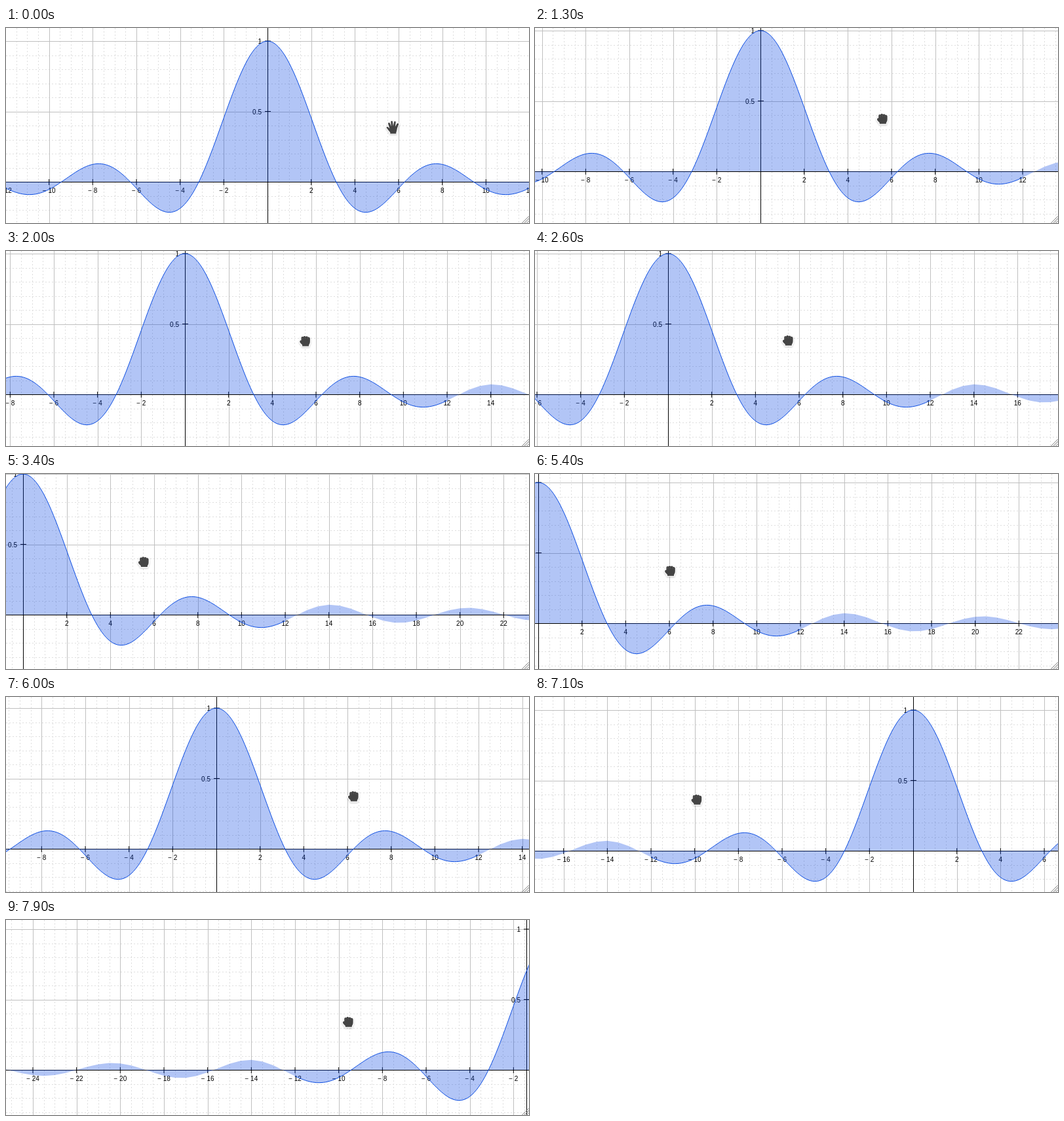
Animation of 798 by 298 pixels, one loop 8000 ms. Source, as an HTML page:

```html
<!DOCTYPE html>
<html lang="en">
<head>
<meta charset="utf-8">
<title>Dragging a function graph</title>
<style>
html, body { margin: 0; width: 100%; height: 100%; overflow: hidden; background: #fff; }
svg { display: block; }
path { fill: none; }
text { font: 10px "Liberation Sans", Arial, sans-serif; fill: #000; }
#minor { stroke: #dedede; stroke-dasharray: 2 3; }
#major { stroke: #c0c0c0; }
#axes { stroke: #000; }
#area { fill: #0040e0; fill-opacity: .3; }
#curve { stroke: #0d4ee2; }
.halo { stroke: #fff; stroke-width: 2.4; fill: #fff; stroke-linejoin: round; filter: drop-shadow(0 1px 1px #0003); }
.skin { fill: #444; }
.crease { stroke: #666; stroke-width: .5; }
</style>
</head>
<body>
<svg width="798" height="298" viewBox="0 0 798 298">
  <path id="minor"/>
  <path id="major"/>
  <path id="axes"/>
  <g id="labels"></g>
  <path id="area"/>
  <path id="curve"/>
  <path d="M787.5 298L798 287.5M791 298L798 291M794.5 298L798 294.5" stroke="#777"/>
  <g id="open">
    <path class="halo"/><path class="skin"/>
  </g>
  <g id="fist">
    <g transform="scale(1.12)">
      <path class="halo"/><path class="skin"/>
      <path class="crease" d="M-3.2 -5V-2.5M.3 -5.6V-3M3.6 -5V-2.5"/>
    </g>
  </g>
</svg>
<script>
const W = 798, H = 298, LOOP = 8000, STEP = 100;
const UX = 100 / 3, UY = 215, DRAWN = 12;
const $ = id => document.getElementById(id);

// [time, x, y]
const hand = [
  [900, 590, 152], [1300, 530, 139], [2600, 386, 137], [3400, 210, 134.5],
  [4400, 16, 145.5], [4800, 16, 145.5], [6000, 530, 152], [6500, 762, 154],
  [7000, 240, 157], [7900, 522, 156]
];
const origin = [
  [900, 399, 235], [1300, 344, 219], [2600, 203, 219], [3400, 26, 215],
  [4400, -176, 226], [4800, -176, 226], [6000, 321, 232], [6500, 571, 235],
  [7000, 571, 235], [7900, 841, 229]
];

const shapes = {
  open: "M-9.4 .6C-9.8 -.9 -8 -1.6 -6.8 -.4L-4.6 1.7L-6.9 -5.6C-7.4 -7.6 -5 -8.4 -4.2 -6.6" +
    "L-2.3 -1.8L-2.8 -8.2C-2.8 -10.4 -.3 -10.5 0 -8.4L.7 -2.2L2.1 -8.4C2.6 -10.3 5 -9.8 4.7 -7.8" +
    "L3.9 -1.3L6.6 -5.8C7.6 -7.4 9.8 -6.2 9 -4.4L6.9 1.2C6.4 4.2 6 6 5.3 7.6V9.4H-3.8V7.6" +
    "C-5.4 5.6 -7.2 3.6 -9.4 .6Z",
  fist: "M-5.2 -1.2V-4.2C-5.2 -6.4 -3.2 -6.8 -2.4 -5.8C-1.7 -7.4 .3 -7.4 .9 -6.1" +
    "C1.8 -7.1 3.6 -6.8 4 -5.3C5.2 -6 6.8 -5.2 6.8 -3.4V.4C6.8 3 5.6 4.2 5.2 5.4V6.8H-3.8V5.2" +
    "C-4.6 3.8 -7.2 2.6 -7.2 .6C-7.2 -.8 -6.4 -1.3 -5.2 -1.2Z"
};
for (const id in shapes) {
  $(id).querySelectorAll(".halo, .skin").forEach(p => p.setAttribute("d", shapes[id]));
}

// Monotone cubic interpolation of column c
function track(keys, t, c) {
  const last = keys.length - 1;
  if (t <= keys[0][0]) return keys[0][c];
  if (t >= keys[last][0]) return keys[last][c];
  const secant = i => (keys[i + 1][c] - keys[i][c]) / (keys[i + 1][0] - keys[i][0]);
  const slope = i => {
    if (i === 0) return 0;
    if (i === last) return secant(i - 1);
    const a = secant(i - 1), b = secant(i);
    return a * b > 0 ? 2 * a * b / (a + b) : 0;
  };
  const i = keys.findIndex(k => k[0] > t) - 1;
  const d = keys[i + 1][0] - keys[i][0], u = (t - keys[i][0]) / d, v = 1 - u;
  return v * v * (1 + 2 * u) * keys[i][c] + u * u * (3 - 2 * u) * keys[i + 1][c] +
    d * u * v * (v * slope(i) - u * slope(i + 1));
}

const f = x => x ? Math.sin(x) / x : 1;
// Centre of the pixel that a hairline fills
const snap = v => Math.round(v + 1e-6) + .5;
const label = (s, x, y, anchor) => `<text x="${x}" y="${y}" text-anchor="${anchor}">${s}</text>`;

function drawGrid(ox, oy) {
  const axisX = Math.min(Math.max(snap(ox), 4.5), W - 3.5);
  let minor = "", major = "", texts = "";
  let axes = `M0 ${snap(oy)}H${W}M${axisX} 0V${H}`;

  for (let k = Math.floor(-ox / UX * 2) - 3; k <= (W - ox) / UX * 2 + 3; k++) {
    const x = ox + k * UX / 2, line = `M${snap(x)} 0V${H}`;
    if (k % 4) { minor += line; continue; }
    major += line;
    if (!k) continue;
    const n = k / 2;
    axes += `M${x} ${oy - 4}V${oy + 5}`;
    texts += label(n < 0 ? "− " + -n : n, x, oy + 17, "middle");
  }
  for (let k = Math.floor((oy - H) / UY * 10); k <= oy / UY * 10 + 1; k++) {
    const y = oy - k * UY / 10, line = `M0 ${snap(y)}H${W}`;
    if (k % 5) { minor += line; continue; }
    major += line;
    if (!k) continue;
    axes += `M${axisX - 4.5} ${y}H${axisX + 4.5}`;
    texts += ox < 4 ? label(k / 10, axisX + 8.5, y + 4, "start")
                    : label(k / 10, axisX - 9.5, y + 4, "end");
  }
  $("minor").setAttribute("d", minor);
  $("major").setAttribute("d", major);
  $("axes").setAttribute("d", axes);
  $("labels").innerHTML = texts;
}

function drawCurve(ox, oy) {
  const points = (from, to, step) => {
    const n = Math.round((to - from) / step);
    return Array.from({ length: n + 1 }, (_, i) => {
      const x = from + i * step;
      return (ox + x * UX).toFixed(2) + " " + (oy - f(x) * UY).toFixed(2);
    }).join("L");
  };
  const mid = points(-DRAWN, DRAWN, .1), far = 34;
  $("curve").setAttribute("d", "M" + mid);
  $("area").setAttribute("d", `M${ox - far * UX} ${oy}L` +
    [points(-far, -DRAWN, .5), mid, points(DRAWN, far, .5)].join("L") +
    `L${ox + far * UX} ${oy}Z`);
}

function render(t) {
  const ox = Math.round(track(origin, t, 1)), oy = Math.round(track(origin, t, 2));
  drawGrid(ox, oy);
  drawCurve(ox, oy);
  const closed = t >= 700 && !(t >= 6500 && t < 7000);
  const place = `translate(${track(hand, t, 1).toFixed(1)} ${track(hand, t, 2).toFixed(1)})`;
  for (const id in shapes) {
    $(id).setAttribute("transform", place);
    $(id).style.display = (id === "fist") === closed ? "" : "none";
  }
}

const start = performance.now();
let shown = -1;
function tick() {
  const t = Math.floor((performance.now() - start) % LOOP / STEP) * STEP;
  if (t !== shown) render(shown = t);
  requestAnimationFrame(tick);
}
tick();
</script>
</body>
</html>
```
